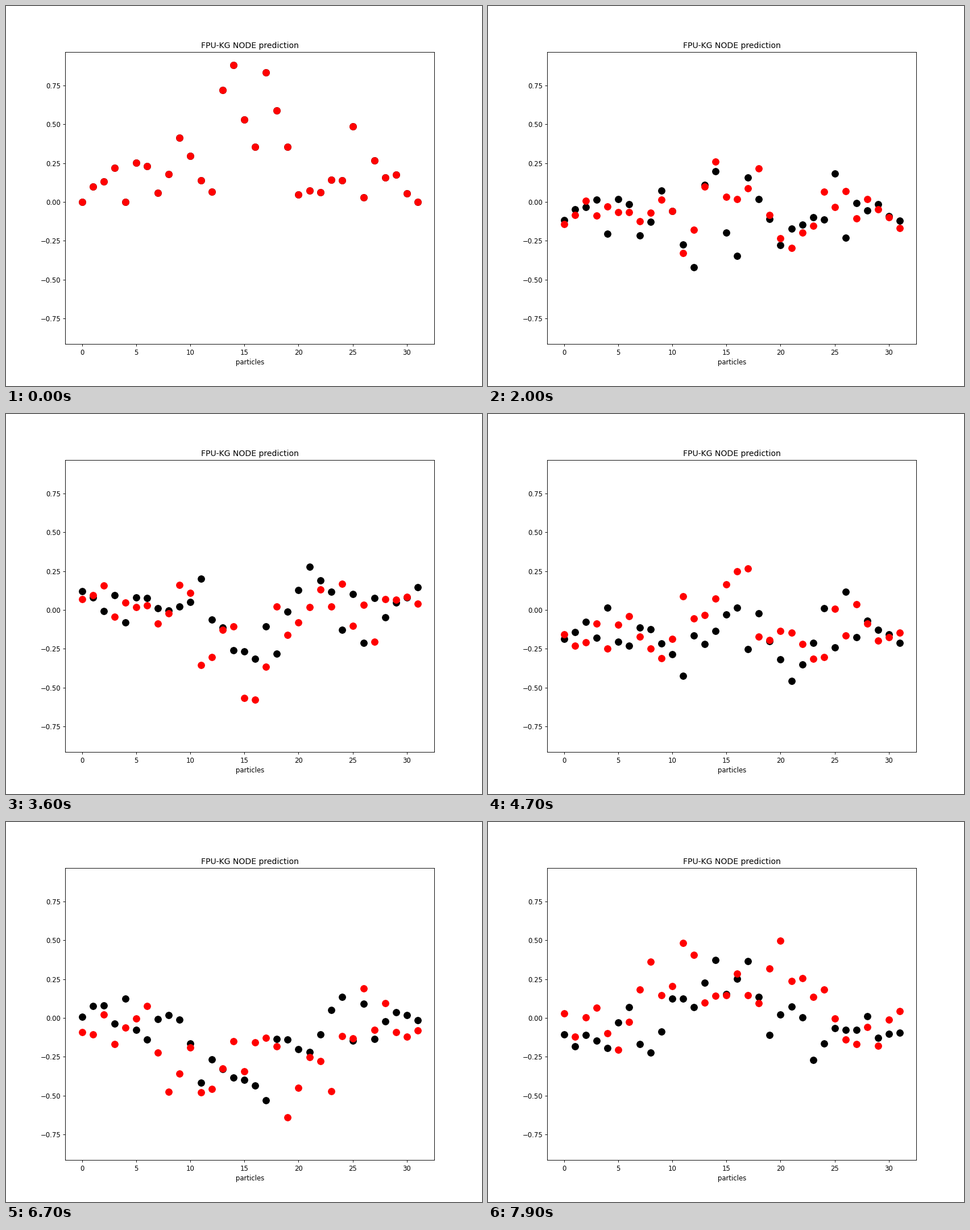
Recreate the animation shown at these times as a matplotlib script. Size 837 px wide and 669 px high, loop 8000 ms.

```python
import numpy as np
import matplotlib.pyplot as plt
from matplotlib.animation import FuncAnimation

W, H, DPI = 837, 669, 83.7
FRAMES, STEP = 80, 100

# Initial displacement of each particle on the ring, released at rest.
start = np.array([
    0, .10, .13, .22, 0, .253, .23, .057, .18, .413, .295, .14, .064, .72, .88, .53,
    .355, .835, .59, .356, .046, .073, .061, .144, .138, .485, .029, .265, .158, .177, .053, 0])
sites = np.arange(len(start))


def swing(t, period, spread):
    """Displacements at time t: every lattice mode oscillates at its own rate."""
    modes = np.fft.rfft(start)
    k = 2 * np.pi * np.arange(len(modes)) / len(start)
    omega = 2 * np.pi / period + 2 * spread * np.sin(k / 2)
    return np.fft.irfft(modes * np.cos(omega * t), len(start))


fig, ax = plt.subplots(figsize=(W / DPI, H / DPI), dpi=DPI)
fig.subplots_adjust(left=0.1247, top=0.8795)
ax.set_xlim(-1.55, 32.55)
ax.set_ylim(-0.9165, 0.967)
ax.set_yticks(np.arange(-0.75, 0.76, 0.25))
ax.set_title("FPU-KG NODE prediction")
ax.set_xlabel("particles")

# Colour, period of the uniform mode in seconds, dispersion.
chains = [("black", 2.88, 0.62), ("red", 2.80, 1.0)]
dots = [ax.plot(sites, start, "o", color=c, ms=10)[0] for c, _, _ in chains]


def update(i):
    t = i * STEP / 1000
    for line, (_, period, spread) in zip(dots, chains):
        line.set_ydata(swing(t, period, spread))
    return dots


anim = FuncAnimation(fig, update, frames=FRAMES, interval=STEP,
                     repeat=True, repeat_delay=0)
plt.show()
```
